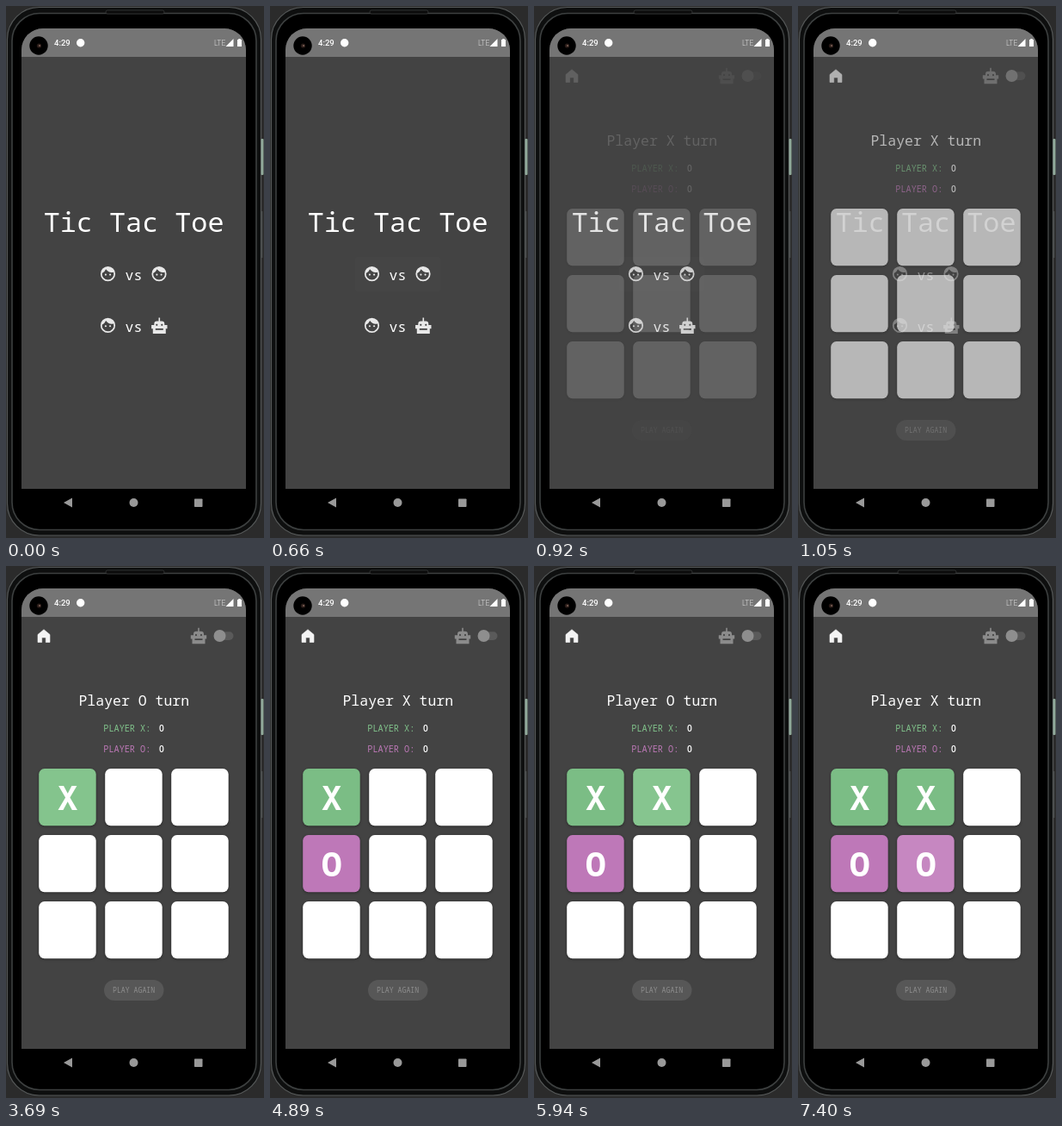
An HTML page for the animation above (8 s loop, 300 px wide and 617 px high).

```html
<!DOCTYPE html>
<html lang="en">
<head>
<meta charset="utf-8">
<title>Tic Tac Toe</title>
<style>
  html, body { margin: 0; width: 100%; height: 100%; overflow: hidden; background: #2b2b2b; }
  svg { display: block; width: 100vw; height: 100vh; }
  text { font-family: "Noto Sans Mono", "DejaVu Sans Mono", monospace; fill: #fff; }
  .mid { text-anchor: middle; }
  .status { font-family: Roboto, sans-serif; font-size: 9.5px; }
  .label { font-size: 10.2px; font-weight: 500; }
  .score { font: 600 10.2px "Open Sans", sans-serif; }
  .mark { font-size: 40px; font-weight: 650; }
  .tile { filter: drop-shadow(0 1.3px 1.4px rgba(0, 0, 0, .4)); }
</style>
</head>
<body>
<svg viewBox="0 0 300 617">
  <defs>
    <path id="face" transform="scale(.86) translate(-12 -12)" fill-rule="evenodd" d="M9 11.75a1.25 1.25 0 1 0 0 2.5a1.25 1.25 0 1 0 0-2.5zm6 0a1.25 1.25 0 1 0 0 2.5a1.25 1.25 0 1 0 0-2.5zM12 2a10 10 0 1 0 0 20a10 10 0 1 0 0-20zm0 18a8 8 0 0 1-7.95-8.86a10.05 10.05 0 0 0 5.21-5.37A9.99 9.99 0 0 0 19.67 9.74A8 8 0 0 1 12 20z"/>
    <path id="robot" fill-rule="evenodd" d="M-.8-5.5V-9.5H.8V-5.5H2.8A3.2 3.2 0 0 1 6-2.3V-1H9.2V3.2H7.5V9H-7.5V3.2H-9.2V-1H-6V-2.3A3.2 3.2 0 0 1-2.8-5.5ZM-3-2.3a1.1 1.1 0 1 0 0 2.2a1.1 1.1 0 1 0 0-2.2ZM3-2.3a1.1 1.1 0 1 0 0 2.2a1.1 1.1 0 1 0 0-2.2ZM-4.5 3H4.5V4.7H-4.5Z"/>
  </defs>

  <!-- Phone -->
  <rect x="1.5" y="1.5" width="295" height="612.5" rx="37" fill="#0e0f0f" stroke="#555858" stroke-width="1.2"/>
  <rect x="7" y="8.5" width="284" height="599" rx="32" stroke="#3d4040" stroke-width="1.6"/>
  <rect x="116" y="5" width="68" height="4" rx="2" fill="#0b0b0b" stroke="#3c3e3e" stroke-width=".7"/>
  <rect x="296.5" y="154" width="3" height="42" rx="1" fill="#91aa9b"/>
  <rect x="297" y="238" width="1.5" height="54" fill="#454848"/>
  <path d="M18 560V51A25 25 0 0 1 43 26H254A25 25 0 0 1 279 51V560Z" fill="#434343"/>
  <path d="M18 59V51A25 25 0 0 1 43 26H254A25 25 0 0 1 279 51V59Z" fill="#757575"/>
  <circle cx="38" cy="46" r="10.7"/>
  <circle cx="38.5" cy="46" r="2.6" fill="#2b1d19"/>
  <circle cx="39" cy="46" r="1" fill="#80645a"/>
  <text class="status" x="56" y="46.3" font-weight="500">4:29</text>
  <circle cx="86.7" cy="42.8" r="4.7" fill="#fff"/>
  <text class="status" x="242" y="46" style="font-size:8.5px;font-weight:300;fill:#ddd">LTE</text>
  <path d="M255.5 47L264.5 38V47Z" fill="#fff"/>
  <path d="M269 39H270.3V38H272.7V39H274V47H269Z" fill="#fff"/>
  <g fill="#999">
    <path d="M67 576L77 570.5V581.5Z"/>
    <circle cx="148.5" cy="576" r="5"/>
    <rect x="219" y="571.5" width="9.5" height="9.5" rx=".7"/>
  </g>

  <!-- Game -->
  <g id="game">
    <path d="M37 79.5L44 73.7L51 79.5V88.5H46.3V83H41.7V88.5H37Z" fill="#f4f4f4" stroke="#f4f4f4" stroke-width=".6" stroke-linejoin="round"/>
    <use href="#robot" x="224" y="81.3" fill="#8b8b8b"/>
    <rect x="244" y="76.3" width="20.5" height="9.6" rx="4.8" fill="#5a5a5a"/>
    <circle cx="248.5" cy="81" r="7" fill="#8e8e8e"/>
    <text id="turn" class="mid" x="148.8" y="162.3" font-size="16.5"></text>
    <text class="label" x="113.3" y="192.3" style="fill:#81c38b">PLAYER X:</text>
    <text class="label" x="113.3" y="216" style="fill:#bd78b7">PLAYER O:</text>
    <text class="score mid" x="180.8" y="192.3">0</text>
    <text class="score mid" x="180.8" y="216">0</text>
    <g id="board"></g>
    <rect x="114" y="480" width="69.5" height="24" rx="12" fill="#575757"/>
    <text class="mid" x="148.6" y="495.2" font-size="8.2" style="fill:#8e8e8e">PLAY AGAIN</text>
  </g>

  <!-- Menu -->
  <g id="menu">
    <text class="mid" x="148.6" y="262.3" font-size="31.8">Tic Tac Toe</text>
    <rect id="press" x="99" y="291" width="99" height="40" rx="3" fill="#fff" opacity=".015"/>
    <g fill="#e8e8e8">
      <use href="#face" x="118.5" y="310.7"/>
      <use href="#face" x="178" y="310.7"/>
      <use href="#face" x="118.5" y="370.4"/>
      <use href="#robot" x="178.3" y="371"/>
    </g>
    <text class="mid" x="148.5" y="318" font-size="16.5">vs</text>
    <text class="mid" x="148.5" y="377.5" font-size="16.5">vs</text>
  </g>
</svg>

<script>
const LOOP = 8000;
const PRESS_AT = 660;
const FADE = [[920, 0.17], [1050, 0.62], [1180, 1]];
const MOVES = [
  { at: 3690, cell: 0, mark: "X", fresh: "#84c48d" },
  { at: 4890, cell: 3, mark: "O", fresh: "#be78b8" },
  { at: 5940, cell: 1, mark: "X", fresh: "#86c58f" },
  { at: 7400, cell: 4, mark: "O", fresh: "#c687c1" }
];
const SETTLED = { X: "#7bbd85", O: "#be78b8" };
const byId = id => document.getElementById(id);

byId("board").innerHTML = Array.from({ length: 9 }, (_, i) => {
  const x = 38.2 + (i % 3) * 77, y = 235 + Math.floor(i / 3) * 77;
  return `<rect class="tile" x="${x}" y="${y}" width="66.5" height="66.2" rx="6.5"/>
    <text class="mark mid" x="${x + 33.5}" y="${y + 48.3}"></text>`;
}).join("");
const tiles = [...document.querySelectorAll(".tile")];
const marks = [...document.querySelectorAll(".mark")];

function draw(t) {
  const played = MOVES.filter(move => move.at <= t);
  const step = FADE.filter(([at]) => at <= t).pop();
  const shown = step ? step[1] : 0;
  byId("press").style.display = t >= PRESS_AT ? "" : "none";
  byId("game").style.opacity = shown;
  byId("menu").style.opacity = 1 - shown;
  byId("turn").textContent = `Player ${played.length % 2 ? "O" : "X"} turn`;
  tiles.forEach((tile, i) => {
    const move = played.find(m => m.cell === i);
    const isLast = move && move === played[played.length - 1];
    tile.style.fill = !move ? "#fff" : isLast ? move.fresh : SETTLED[move.mark];
    marks[i].textContent = move ? move.mark : "";
  });
}

const start = performance.now();
function tick() {
  draw((performance.now() - start) % LOOP);
  requestAnimationFrame(tick);
}
tick();
</script>
</body>
</html>
```
